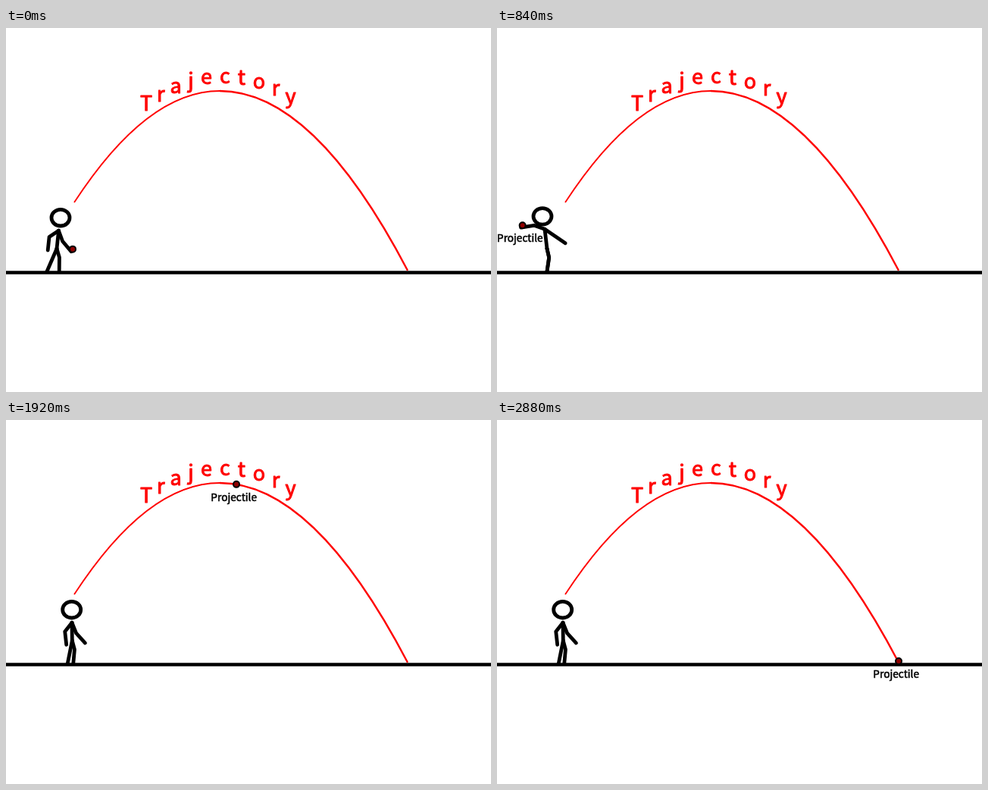
Write an HTML page with a canvas that moves like this. It is 640x480 px and loops after 3.6 s.

```html
<!DOCTYPE html>
<html lang="en">
<head>
<meta charset="utf-8">
<title>Projectile trajectory</title>
<style>
  html, body { margin: 0; width: 100%; height: 100%; overflow: hidden; background: #fff; }
  canvas { display: block; }
</style>
</head>
<body>
<canvas id="stage" width="640" height="480"></canvas>
<script>
const ctx = document.getElementById('stage').getContext('2d');
const FONT = '"Noto Sans CJK JP", "Noto Sans CJK SC", "Noto Sans", sans-serif';
const LOOP = 3600, STEP = 30, LAST = 2880, LABEL_AT = 660, RELEASE = 1170;
const GROUND = 322.5, HIP = 291, FOOT = 321;

// Time, neck x, lean of the body, throwing arm and other arm in degrees
// from straight down (positive is forward), stride
const poses = [
  [90, 69.5, -2.5, 31, -29, 13],
  [360, 62, 1.5, -29, 47, 0],
  [630, 60.5, 3, -100, 54, 0],
  [840, 63, 3, -94, 56, 0],
  [RELEASE, 81, -1, -188, -20, 9],
  [1500, 91.5, -2.5, -299, -28, 9],
  [1710, 87, 0.3, -327, -14, 6],
];

// Ball's x in flight; its height follows from the curve
const flight = [[RELEASE, 85.5], [1500, 201], [1710, 262], [1920, 304], [2400, 391.5], [LAST, 530]];

const apex = {x: 282, y: 83};
const curveY = x => apex.y + (x - apex.x) ** 2 * (x < apex.x ? 0.00399 : 0.00385);

function poseAt(t) {
  const end = poses.length - 1;
  let i = 0;
  while (i < end - 1 && poses[i + 1][0] <= t) i++;
  const a = poses[i], b = poses[i + 1];
  const u = Math.max(0, Math.min(1, (t - a[0]) / (b[0] - a[0])));
  return a.map((v, n) => v + (b[n] - v) * u);
}

// Cubic Hermite through the flight points
function flightX(t) {
  const end = flight.length - 1;
  let i = 0;
  while (i < end - 1 && flight[i + 1][0] <= t) i++;
  const slope = n => {
    const a = flight[Math.max(n - 1, 0)], b = flight[Math.min(n + 1, end)];
    return (b[1] - a[1]) / (b[0] - a[0]);
  };
  const [t0, x0] = flight[i], [t1, x1] = flight[i + 1];
  const d = t1 - t0, u = (t - t0) / d, v = 1 - u;
  return v * v * ((1 + 2 * u) * x0 + u * d * slope(i)) +
         u * u * ((1 + 2 * v) * x1 - v * d * slope(i + 1));
}

function line(width, color, ...pts) {
  ctx.lineWidth = width;
  ctx.strokeStyle = color;
  ctx.beginPath();
  for (let i = 0; i < pts.length; i += 2) ctx.lineTo(pts[i], pts[i + 1]);
  ctx.stroke();
}

// Two-part limb whose joint bends to the side given by the sign of bend
function limb(x0, y0, x1, y1, upper, lower, bend) {
  const dx = x1 - x0, dy = y1 - y0, d = Math.hypot(dx, dy);
  const along = d < upper + lower ? (d * d + upper * upper - lower * lower) / (2 * d) : d / 2;
  const off = bend * Math.sqrt(Math.max(0, upper * upper - along * along));
  line(4.8, '#000', x0, y0,
    x0 + (dx * along + dy * off) / d, y0 + (dy * along - dx * off) / d, x1, y1);
}

// Regular weight thickened by an outline
function text(str, x, y, size, color, weight) {
  ctx.font = `400 ${size}px ${FONT}`;
  ctx.fillStyle = ctx.strokeStyle = color;
  ctx.lineWidth = weight;
  ctx.fillText(str, x, y);
  ctx.strokeText(str, x, y);
  return ctx.measureText(str).width;
}

// Letters follow an arch, closer together where it is steep
function drawTitle() {
  ctx.textAlign = 'left';
  let x = 177;
  for (const ch of 'Trajectory') {
    ctx.font = `400 27px ${FONT}`;
    const middle = x + ctx.measureText(ch).width / 2;
    x += text(ch, x, 72.5 + 0.0035 * (middle - 287) ** 2, 27, '#f00', 1);
    x += 10.1 - ((x - 287) / 45) ** 2;
  }
}

function drawScene() {
  ctx.fillStyle = '#fff';
  ctx.fillRect(0, 0, 640, 480);
  ctx.lineCap = 'butt';
  ctx.lineJoin = 'round';
  line(4.7, '#000', 0, GROUND, 640, GROUND);
  ctx.strokeStyle = '#f00';
  for (const [x, width] of [[90, 1.8], [530, 2.4]]) {
    ctx.lineWidth = width;
    ctx.beginPath();
    ctx.moveTo(x, curveY(x));
    ctx.quadraticCurveTo((x + apex.x) / 2, apex.y, apex.x, apex.y);
    ctx.stroke();
  }
  drawTitle();
}

// Returns where the throwing hand ends up
function drawFigure([, x, lean, throwing, other, stride]) {
  const rad = Math.PI / 180, hip = x + lean;
  const neck = 265.5 + 2 * Math.cos(throwing * rad);
  const arm = (deg, reach) => {
    const hand = [x + reach * Math.sin(deg * rad), neck + reach * Math.cos(deg * rad)];
    limb(x, neck, ...hand, 15, 17.5, -1);
    return hand;
  };
  ctx.lineCap = 'round';
  line(4.8, '#000', x, neck, hip, HIP);
  for (const dx of [-stride, stride / 4]) limb(hip, HIP, hip + dx, FOOT, 12, 18.5, 1);
  arm(other, 30.7 + 2.5 * Math.sin(other * rad));
  const hand = arm(throwing, 32 - 8 * Math.max(0, -Math.cos(throwing * rad)));
  ctx.beginPath();
  ctx.ellipse(x - lean, neck - 17, 12, 10.8, 0, 0, 7);
  ctx.stroke();
  return hand;
}

function drawBall(x, y, labelled) {
  ctx.beginPath();
  ctx.arc(x, y, 4, 0, 7);
  ctx.fillStyle = '#8f0000';
  ctx.fill();
  ctx.lineWidth = 2;
  ctx.strokeStyle = '#000';
  ctx.stroke();
  ctx.textAlign = 'center';
  if (labelled) text('Projectile', x - 3.3, y + 22.2, 13.7, '#000', 0.5);
}

function frame(now) {
  const t = Math.min(Math.floor(now % LOOP / STEP) * STEP, LAST);
  drawScene();
  const [handX, handY] = drawFigure(poseAt(t));
  if (t < RELEASE) {
    drawBall(handX + 2, handY - 3, t >= LABEL_AT);
  } else {
    const x = flightX(t);
    drawBall(x, Math.min(curveY(x), 318), true);
  }
  requestAnimationFrame(frame);
}

requestAnimationFrame(frame);
</script>
</body>
</html>
```
